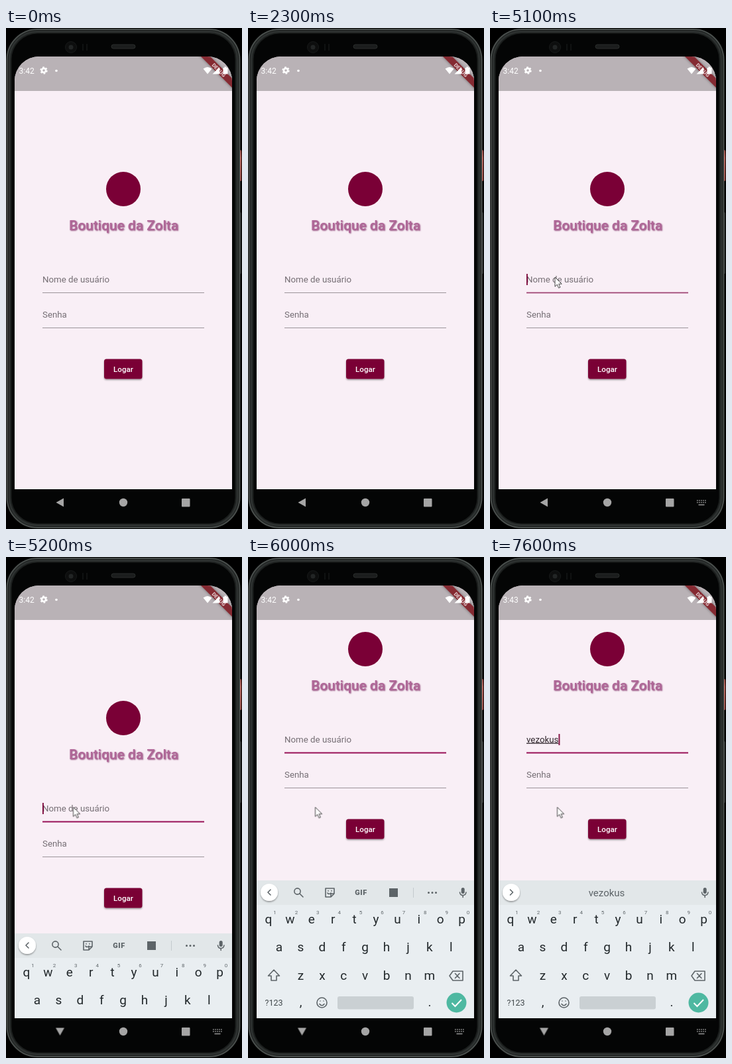
These frames come from a looping animation (356 px wide and 756 px high, 8 s). An HTML page:

```html
<!DOCTYPE html>
<html lang="pt-BR">
<head>
<meta charset="utf-8">
<title>Login</title>
<style>
html, body { margin: 0; width: 100%; height: 100%; overflow: hidden; background: #000; }
svg { display: block; width: 356px; height: 756px; font-family: Roboto, "Noto Sans", sans-serif; }
.mid { text-anchor: middle; }
.label { font-size: 13.3px; fill: #756e74; }
.typed { font-size: 13.3px; fill: #30262c; }
.typed tspan { text-decoration: underline; }
.title { font-size: 20.9px; font-weight: 500; fill: #b06798; text-shadow: 1px 1px 2px rgba(110, 20, 80, .75); }
.icon { fill: none; stroke: #5d6468; stroke-width: 1.6; stroke-linejoin: round; stroke-linecap: round; }
.solid { fill: #5d6468; }
.key { font-size: 19px; fill: #22282b; text-anchor: middle; }
.hint { font-size: 8px; fill: #60676b; text-anchor: middle; }
.word { font-size: 15px; fill: #5d6468; text-anchor: middle; }
.nav { fill: #a5a5a5; }

/* 1% of the loop = 80 ms */
.anim { animation: 8s step-end infinite; }
.form { animation-name: scroll; }
.keyboard { animation-name: slide; }
.pointer { animation-name: point; }
.focus { animation-name: focus; }
.caret { animation-name: blink; }
.tools { animation-name: leave; }
.words { animation-name: enter; }
.ime { animation-name: ime; }
.back { animation-name: back; transform-origin: 81.5px 716px; }

@keyframes scroll {
  0% { transform: none; }
  67.5% { transform: translateY(-62px); }
  68.75%, 100% { transform: translateY(-104px); }
}
@keyframes slide {
  0% { transform: translateY(210px); }
  65% { transform: translateY(80px); }
  66.25%, 100% { transform: none; }
}
@keyframes point {
  0% { transform: translate(334px, 718px); visibility: hidden; }
  50% { transform: translate(334px, 718px); visibility: visible; }
  51.25% { transform: translate(222px, 646px); }
  52.5% { transform: translate(96px, 560px); }
  53.75% { transform: translate(44px, 480px); }
  56.25% { transform: translate(94px, 394px); }
  61.25% { transform: translate(98px, 376px); }
  65%, 100% { transform: translate(101.5px, 377.5px); visibility: visible; }
}
@keyframes focus {
  0% { opacity: 0; }
  62.5% { opacity: .3; }
  63.75% { opacity: .6; }
  65%, 100% { opacity: 1; }
}
@keyframes blink {
  0% { opacity: 0; }
  62.5% { opacity: 1; }
  72.5% { opacity: 0; }
  76.25%, 100% { opacity: 1; }
}
@keyframes leave { 0% { opacity: 1; } 76.25%, 100% { opacity: 0; } }
@keyframes enter { 0% { opacity: 0; } 76.25%, 100% { opacity: 1; } }
@keyframes ime { 0% { opacity: 0; } 62.5%, 100% { opacity: 1; } }
@keyframes back { 0% { transform: none; } 65%, 100% { transform: rotate(-90deg); } }
</style>
</head>
<body>
<svg viewBox="0 0 356 756">
  <defs>
    <clipPath id="screen"><path d="M13 696V80A37 37 0 0 1 50 43H304A37 37 0 0 1 341 80V696Z"/></clipPath>
    <linearGradient id="power" x2="0" y2="1">
      <stop stop-color="#b04c44"/><stop offset=".25" stop-color="#e57469"/><stop offset="1" stop-color="#b9534b"/>
    </linearGradient>
    <filter id="lift" x="-20%" y="-20%" width="140%" height="160%">
      <feDropShadow dx="0" dy="1.5" stdDeviation="1.2" flood-opacity=".4"/>
    </filter>
    <filter id="glow" x="-30%" y="-30%" width="160%" height="160%">
      <feDropShadow dx="0" dy="0" stdDeviation="2" flood-opacity=".45"/>
    </filter>
  </defs>

  <!-- phone body -->
  <rect width="356" height="756"/>
  <rect x="351" y="184" width="4" height="47" rx="1.5" fill="url(#power)"/>
  <rect x="351" y="278" width="4" height="93" rx="1.5" fill="#272b2a"/>
  <rect x="1.5" y="2" width="351" height="752" rx="46" fill="#1b1e1d" stroke="#4a4f4d" stroke-width="2"/>
  <rect x="5" y="5.5" width="344" height="745" rx="42" fill="none" stroke="#2d3130" stroke-width="3"/>
  <rect x="8.5" y="8.5" width="337" height="739" rx="39" fill="#040505"/>
  <circle cx="98" cy="29" r="8.5" fill="#0d0e0e" stroke="#171919"/>
  <circle cx="98" cy="29" r="3.5" fill="#222525"/>
  <path d="M116 24V34M122 24V34" stroke="#101212" stroke-width="2"/>
  <rect x="159" y="25" width="36" height="6" rx="3" fill="#1b1d1d" stroke="#2a2d2c"/>

  <g clip-path="url(#screen)">
    <rect x="13" y="43" width="328" height="653" fill="#f9eff6"/>
    <g class="anim form">
      <circle cx="177" cy="243" r="26" fill="#7a0036"/>
      <text class="title mid" x="177.5" y="304.5">Boutique da Zolta</text>
      <text class="label" x="55" y="383.5" id="nameLabel">Nome de usuário</text>
      <text class="typed" x="55" y="383.5" id="typed"></text>
      <rect x="55" y="399" width="244" height="1" fill="#9c949a"/>
      <rect class="anim focus" x="55" y="398.5" width="244" height="2" fill="#981056"/>
      <g class="anim caret"><rect id="caret" x="55" y="371" width="1.8" height="17" fill="#7a0036"/></g>
      <text class="label" x="55" y="437">Senha</text>
      <rect x="55" y="452" width="244" height="1" fill="#9c949a"/>
      <rect x="148" y="499.5" width="57.5" height="30" rx="3.5" fill="#7a0036" filter="url(#lift)"/>
      <text class="mid" x="177" y="519" font-size="11.6" font-weight="500" fill="#fff">Logar</text>
    </g>

    <!-- status bar -->
    <rect x="13" y="43" width="328" height="52" fill="#b9b2b6"/>
    <path d="M284 33L351 100V86L298 33Z" fill="#852a33" filter="url(#glow)"/>
    <text class="mid" transform="translate(319 65.5) rotate(45)" font-size="8" font-weight="900" fill="#dfc5c8">DEBUG</text>
    <g fill="#fff">
      <g font-size="12">
        <text x="19.5" y="69" id="before">3:42</text>
        <text x="19.5" y="69" id="after">3:43</text>
      </g>
      <circle cx="57" cy="64" r="3.1" fill="none" stroke="#fff" stroke-width="2.6"/>
      <circle cx="57" cy="64" r="4.8" fill="none" stroke="#fff" stroke-width="1.8" stroke-dasharray="2.6 2.427"/>
      <circle cx="76" cy="64.5" r="1.8"/>
      <path d="M297.5 61.5Q304 56.5 310.5 61.5L304 69.5Z"/>
      <path d="M311.5 69.5L322 59V69.5Z"/>
      <path d="M327.5 60H329.5V58.5H332.5V60H334.5V69.5H327.5Z"/>
    </g>

    <g class="anim keyboard">
      <rect x="13" y="488" width="328" height="208" fill="#e9eef1"/>
      <rect x="13" y="488" width="328" height="37" fill="#e2e7e9"/>
      <circle cx="32" cy="506" r="13" fill="#fff" filter="url(#lift)"/>
      <g class="anim tools">
        <path class="icon" d="M34 502L30 506L34 510"/>
        <circle class="icon" cx="74.5" cy="504.5" r="4.6"/>
        <path class="icon" d="M78 508L83 513"/>
        <path class="icon" d="M117 500H130V508L125 513H117ZM130 508H125V513M120 507Q122 510 125 507M121 503.5V504M126 503.5V504"/>
        <text class="mid solid" x="170.5" y="510" font-size="11" font-weight="900" letter-spacing=".6">GIF</text>
        <rect class="solid" x="213" y="500" width="13" height="13"/>
        <path d="M249.5 499V514" stroke="#c4cacd"/>
        <path class="icon" d="M272.5 506.5h.01M278 506.5h.01M283.5 506.5h.01" style="stroke-width:3"/>
      </g>
      <g class="anim words">
        <path class="icon" d="M30.5 502L34.5 506L30.5 510"/>
        <g id="words"></g>
      </g>
      <rect class="solid" x="321.7" y="499" width="5" height="9" rx="2.5"/>
      <path class="icon" d="M319.5 506Q320 510.5 324.2 510.5T329 506M324.2 511V513.5"/>
      <g id="keys"></g>
      <path class="icon" d="M39 623L30.5 632H35V639H43V632H47.5Z"/>
      <path class="icon" d="M309 625H324V639H309L304 632ZM312.5 628.5L319 635.5M319 628.5L312.5 635.5"/>
      <text class="mid" x="39" y="677" font-size="12.5" fill="#41484b">?123</text>
      <circle class="icon" cx="111.5" cy="672.5" r="7.5"/>
      <path class="icon" d="M108 674.5Q111.5 679 115 674.5M109 670h.01M114 670h.01"/>
      <rect x="135" y="663" width="115" height="19.5" rx="3" fill="#cad0d3"/>
      <circle cx="314.5" cy="672.5" r="15" fill="#4eb8a1"/>
      <path d="M307.5 673L312.5 678L322 668" fill="none" stroke="#fff" stroke-width="2"/>
    </g>
  </g>

  <!-- navigation bar -->
  <path class="anim back nav" d="M75.5 716L87 709.5V722.5Z"/>
  <circle class="nav" cx="177" cy="716" r="6.2"/>
  <rect class="nav" x="265" y="710" width="12.5" height="12.5" rx="1"/>
  <g class="anim ime" fill="none" stroke="#909090">
    <path d="M312 713H326M312 716H326" stroke-width="1.7" stroke-dasharray="1.7 1.3"/>
    <path d="M314.5 719.5H323.5" stroke-width="1.6"/>
  </g>

  <path class="anim pointer" d="M0 0V14.2L3.3 11.1L5.6 16.3L7.9 15.3L5.7 10.2H10.2Z" fill="#fff" stroke="#333" stroke-width=".9"/>
</svg>
<script>
const LOOP = 8000;
const $ = id => document.getElementById(id);
const user = "vezokus";
const strokes = [6100, 6200, 6300, 6400, 6500, 7000, 7600];

function add(parent, tag, text, attrs = {}) {
  const node = document.createElementNS("http://www.w3.org/2000/svg", tag);
  for (const name in attrs) node.setAttribute(name, attrs[name]);
  node.textContent = text;
  return $(parent).appendChild(node);
}

// hard steps: each value holds until the next time
function step(node, property, values, times) {
  node.animate(
    { [property]: values, offset: times.map(t => t / LOOP), easing: "step-end" },
    { duration: LOOP, iterations: Infinity }
  );
}

function show(node, from, to = LOOP) {
  step(node, "visibility", ["hidden", "visible", "hidden", "hidden"], [0, from, to, LOOP]);
}

function addKey(cls, x, y, text) {
  add("keys", "text", text, { class: cls, x, y });
}

function suggest(x, text, from, to) {
  show(add("words", "text", text, { class: "word", x, y: 512 }), from, to);
}

[["qwertyuiop", 31, 553], ["asdfghjkl", 47, 595], ["zxcvbnm", 79.5, 637.5]].forEach(([row, x, y], r) => {
  [...row].forEach((letter, i) => {
    addKey("key", x + i * 32.4, y, letter);
    if (r === 0) addKey("hint", x + 9.5 + i * 32.4, 539, (i + 1) % 10);
  });
});
addKey("key", 79.5, 678, ",");
addKey("key", 274, 678, ".");

[...user].forEach((letter, i) => {
  show(add("typed", "tspan", letter), strokes[i]);
  suggest(176, user.slice(0, i + 1), strokes[i], i < 5 ? strokes[i + 1] : i < 6 ? 7300 : LOOP);
});
suggest(176, user, 7300, strokes[6]);
suggest(85, "vez", strokes[0], 6700);
suggest(85, "veze", 6700, 7000);
suggest(270, "vezes", strokes[0], 7000);

const carets = strokes.map((_, i) => `translateX(${$("typed").getSubStringLength(0, i + 1)}px)`);
step($("caret"), "transform", ["none", ...carets, carets.at(-1)], [0, ...strokes, LOOP]);

show($("nameLabel"), 0, strokes[0]);
show($("before"), 0, 7200);
show($("after"), 7200);
</script>
</body>
</html>
```
